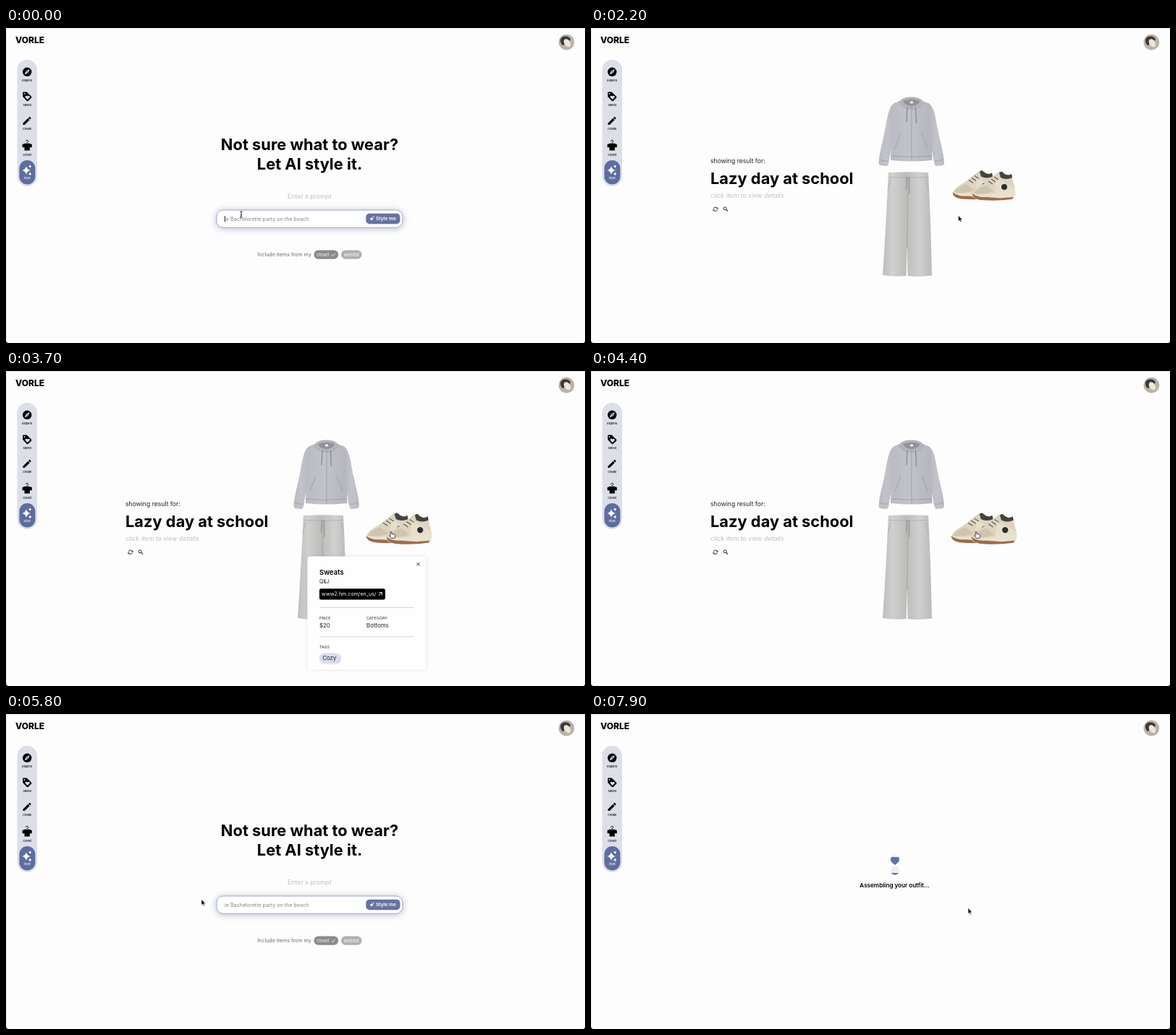
Write an HTML page that moves like this. It is 800 px wide and 436 px high and loops after 8000 ms.

```html
<!DOCTYPE html>
<html lang="en">
<head>
<meta charset="utf-8">
<title>Outfit stylist</title>
<style>
html, body { margin: 0; width: 100%; height: 100%; overflow: hidden; background: #fdfdfd; }
svg { display: block; width: 800px; height: 436px; font-family: Inter, "Liberation Sans", sans-serif; }
text { white-space: pre; }
.mid { text-anchor: middle; }
.h1 { font-size: 21.85px; font-weight: 700; }
.body { font-size: 8.65px; }
.field { font-size: 7.15px; }
.nav { font-size: 3.9px; font-weight: 500; text-anchor: middle; }
.chip { font-size: 6px; fill: #fff; }
.title { font-size: 9.5px; font-weight: 600; }
.cap { font-size: 5.4px; fill: #333; }
.val { font-size: 7.9px; fill: #222; }
.line { fill: none; stroke: #9495a0; stroke-width: .7; }
.input { filter: drop-shadow(0 1px 5px rgba(92, 108, 159, .45)); }
.card { filter: drop-shadow(0 0 2.5px rgba(0, 0, 0, .11)); }
.glow { filter: drop-shadow(1px 1px 1.5px rgba(92, 108, 159, .4)); }
</style>
</head>
<body>
<svg viewBox="0 0 800 436" xmlns="http://www.w3.org/2000/svg">
  <defs>
    <linearGradient id="fleece" x2="1">
      <stop offset="0" stop-color="#babbc3"/><stop offset=".45" stop-color="#c2c3ca"/>
      <stop offset="1" stop-color="#b4b5bd"/>
    </linearGradient>
    <linearGradient id="sweat" x2="1">
      <stop offset="0" stop-color="#bdbdbc"/><stop offset=".2" stop-color="#d0d0cf"/>
      <stop offset=".48" stop-color="#bdbdbc"/><stop offset=".53" stop-color="#c0c0bf"/>
      <stop offset=".75" stop-color="#d0d0cf"/><stop offset="1" stop-color="#bababa"/>
    </linearGradient>
    <path id="drop" d="M420 209C417 206.5 414 205 414 201.3A6 6 0 0 1 426 201.3C426 205 423 206.5 420 209Z"/>
    <clipPath id="topBulb"><use href="#drop"/></clipPath>
    <clipPath id="lowBulb"><use href="#drop" transform="translate(0 418) scale(1 -1)"/></clipPath>
    <g id="sleeve">
      <path d="M421 103C411 107 410 122 405.5 145C402 162 398 174 397.5 187L399 190L409 191.3L411 188C413 176 416 160 419 145Z" fill="url(#fleece)"/>
      <path class="line" d="M398.5 182Q404 185 411 184M418 116L416 158"/>
    </g>
    <g id="shoe">
      <path d="M527 230C529 222 538 219 546 213L561 201Q566 197 569 200Q575 206 581 202Q583 212 586 224L586 231Q556 236 527 231Z" fill="#ddd3be"/>
      <path d="M529 229Q536 220 546 218L556 226Q545 231 529 229Z" fill="#cfc4ad"/>
      <path d="M560 207L585 222L586 227L558 230Z" fill="#e6deca"/>
      <path d="M564 200.5Q567 197.5 569 200Q575 206 581 202L582 207Q574 211 566 207Z" fill="#45433f"/>
      <path d="M549 212L555 216M553 209L559 213M557 206L563 210" stroke="#5d584d" stroke-width="1.1" fill="none"/>
      <path d="M527 229Q540 232 556 229L586 225Q588 230 584 235Q560 238 545 238Q530 238 527 233Z" fill="#e9e1cf"/>
      <path d="M526.5 229Q534 235 546 234L566 235.5L584 234L582 237Q560 240 538 238Q527 236 526.5 229Z" fill="#a06a48"/>
      <circle cx="571" cy="220" r="4" fill="#2d2d30"/>
    </g>
  </defs>

  <rect width="800" height="436" fill="#fdfdfd"/>
  <path d="M0 .5H800M.3 0V436" stroke="#e6e6e6" fill="none"/>
  <path d="M0 433.5V436H2.5ZM800 434V436H798Z" fill="#222"/>

  <text x="13" y="20.7" font-size="12" font-weight="800">VORLE</text>

  <g>
    <circle cx="774.4" cy="19.6" r="10.8" fill="#b9b2a6"/>
    <path d="M766 17C766 12 773 10 778 13C781 15 780 18 777 18C773 18 773 23 769 24C767 22 766 20 766 17Z" fill="#3b3835"/>
    <ellipse cx="775.5" cy="21" rx="4" ry="6" fill="#ece6dc" transform="rotate(-35 775 21)"/>
  </g>

  <rect x="15.5" y="44" width="27.5" height="175" rx="13.7" fill="#dcdfea"/>
  <rect x="18.4" y="183" width="22" height="33.5" rx="11" fill="#5e6d9f"/>
  <circle cx="29.2" cy="60.8" r="6.2"/>
  <path d="M32.9 57L30.6 62.1L25.5 64.5L27.8 59.4Z" fill="#dcdfea"/><circle cx="29.2" cy="60.8" r=".8"/>
  <path d="M24.2 88.6H28.6L35 94.8Q35.8 95.8 35 96.7L30.7 101Q29.8 101.7 28.8 101L23.2 95V89.6Q23.2 88.6 24.2 88.6Z"/>
  <circle cx="25.5" cy="91" r=".9" fill="#dcdfea"/>
  <path d="M29.7 99L27 96.3C25.5 94.4 28 92.6 29.7 94.6C31.4 92.6 33.9 94.4 32.4 96.3Z" fill="#dcdfea"/>
  <path transform="translate(21.6 121) scale(.62)" d="M3 17.2V21H6.8L17.8 9.9L14.1 6.2ZM20.7 7A1 1 0 0 0 20.7 5.6L18.4 3.3A1 1 0 0 0 17 3.3L15.1 5.1L18.9 8.9Z"/>
  <path d="M27 159.4Q29.2 161 31.4 159.4L35.8 161V165.2H32.9V169.6H25.5V165.2H22.6V161Z"/>
  <path d="M29.2 160.2V158.3C31.4 157.6 30.9 155.3 29.2 155.3C28 155.3 27.4 156 27.4 156.9" fill="none" stroke="#000" stroke-width="1"/>
  <path id="navStars" fill="#fff"/>
  <g class="nav">
    <text x="29.2" y="73.6">Explore</text><text x="29.2" y="107.6">Saved</text>
    <text x="29.2" y="141.4">Create</text><text x="29.2" y="176.6">Closet</text>
    <text x="29.2" y="208.7" fill="#fff">Style</text>
  </g>

  <g id="prompt">
    <text class="h1 mid" x="419.5" y="168.5">Not sure what to wear?</text>
    <text class="h1 mid" x="419.5" y="195.5">Let AI style it.</text>
    <text class="body mid" x="419.5" y="236.3" font-weight="500" fill="#c9c9c9">Enter a prompt</text>
    <rect class="input" x="291" y="252" width="257" height="24.2" rx="9" fill="#fff" stroke="#a2aac8"/>
    <text id="hint" class="field" x="302" y="266.8" fill="#858585">ie Bachelorette party on the beach</text>
    <text id="typed" class="field" x="302" y="266.8" fill="#222"></text>
    <rect id="caret" y="260" width=".8" height="8.6"/>
    <rect x="497.3" y="256.8" width="47.2" height="14.4" rx="5" fill="#66739f"/>
    <path id="btnStars" fill="#fff"/>
    <text x="511" y="266.4" font-size="6.6" font-weight="600" fill="#fff">Style me</text>
    <text x="347.3" y="316.3" font-size="7.1" fill="#6c6c6c">Include items from my</text>
    <rect x="425.4" y="307.4" width="33.8" height="12.4" rx="6.2" fill="#8b8b8b"/>
    <text class="chip" x="429.3" y="315.8">closet</text>
    <path d="M449.8 314L451.4 315.7L454.8 311.8" fill="none" stroke="#fff" stroke-width=".8"/>
    <rect x="463" y="307.4" width="28.6" height="12.4" rx="6.2" fill="#b1b1b1"/>
    <text class="chip" x="466.7" y="315.8">wishlist</text>
  </g>

  <g id="loader">
    <g id="glass">
      <g clip-path="url(#topBulb)">
        <rect x="413" y="194" width="14" height="16" fill="#ededf0"/>
        <rect id="topSand" x="413" width="14" height="16" fill="#6472a3"/>
      </g>
      <g clip-path="url(#lowBulb)">
        <rect x="413" y="208" width="14" height="16" fill="#ededf0"/>
        <rect id="lowSand" x="413" width="14" height="16" fill="#6472a3"/>
      </g>
    </g>
    <text class="mid" x="419.5" y="239.9" font-size="8.1" font-weight="600">Assembling your outfit...</text>
  </g>

  <g id="result">
    <text class="body" x="165" y="187.2" fill="#222">showing result for:</text>
    <text class="h1" x="165" y="216.2">Lazy day at school</text>
    <text x="165" y="235.2" font-size="8.8" font-style="italic" fill="#c0c0c0">click item to view details</text>
    <g fill="none" stroke="#111" stroke-width=".9">
      <path d="M169.4 250.2A2.7 2.7 0 0 1 174.3 249.3M174.6 251.4A2.7 2.7 0 0 1 169.7 252.3"/>
      <path d="M173.2 250.2H176L174.8 248.2ZM170.8 251.4H168L169.2 253.4Z" fill="#111" stroke="none"/>
      <circle cx="185.2" cy="249.8" r="2"/><path d="M186.6 251.2L189 253.6" stroke-width="1.1"/>
    </g>
    <g id="hoodie">
      <use href="#sleeve"/><use href="#sleeve" transform="translate(885.5) scale(-1 1)"/>
      <path d="M427 101C420 103 417 106 416 112L414 183Q443 186 471.5 183L469.5 112C469 107 465 103 458 101Z" fill="url(#fleece)"/>
      <path d="M425 104C427 98 434 95.5 442.7 95.5C451 95.5 458 98 460.5 104C456 112 448 113 443 113C437 113 429 111 425 104Z" fill="#b2b3bb"/>
      <path d="M431 101Q442.7 96 454.5 101Q451 108 443 108Q434 108 431 101Z" fill="#92939c"/>
      <path class="line" d="M443 108V184M414.3 177Q443 180 471 177M420 167L428 145M465 167L457 145"/>
      <path class="line" d="M437 110L436 130M448.5 110L449.5 132" style="stroke:#777882;stroke-width:1"/>
      <rect x="441" y="101.5" width="4" height="3" fill="#e9e9ec"/>
    </g>
    <g id="sweats">
      <path d="M411 200Q438 198.5 466 200C468.5 240 470 300 471 342.5Q454 345 437.6 343L436.8 300L435.6 343Q419 345 403 342C406 300 409 240 411 200Z" fill="url(#sweat)"/>
      <path class="line" d="M411 206.5Q438 208 466 206.5M414 209L410 226M463 209L466 226" style="stroke:#aaa"/>
      <path class="line" d="M438 207L437.5 262L436.8 304" style="stroke:#a4a4a4;stroke-width:1"/>
      <path class="line" d="M436.5 206L435.5 224M439.5 206L440 230" style="stroke:#888;stroke-width:.9"/>
    </g>
    <g id="shoes"><use href="#shoe" transform="translate(-27 -1.5)"/><use href="#shoe"/></g>
    <g id="cards"></g>
  </g>

  <g id="cursor">
    <path id="arrow" d="M0 0V8L1.9 6.4L3.2 9.2L4.5 8.6L3.2 5.9H5.7Z" stroke="#fff" stroke-width=".6"/>
    <path id="hand" d="M-.8 .8Q0 -.4 .9 .8V3.4L5 4.3Q6 4.7 5.8 6L5 9.4H.5L-2 6Q-2.2 4.8 -.8 5.5Z" fill="#fff" stroke="#222" stroke-width=".8"/>
    <path id="beam" d="M-1.8 -4.2Q0 -4.2 0 -3.2Q0 -4.2 1.8 -4.2M0 -3.4V3.4M-1.8 4.2Q0 4.2 0 3.2Q0 4.2 1.8 4.2M-1 1H1" fill="none" stroke="#111" stroke-width=".9"/>
  </g>
</svg>
<script>
const LOOP = 8000, STEP = 100;
const $ = id => document.getElementById(id);
const show = (id, on) => { $(id).style.display = on ? '' : 'none'; };
const clamp = v => Math.max(0, Math.min(1, v));
const ease = v => v * v * (3 - 2 * v);
const during = (t, from, to) => t >= from && t < to;

const star = (x, y, r, k = r * .18) =>
  `M${x} ${y - r}Q${x + k} ${y - k} ${x + r} ${y}Q${x + k} ${y + k} ${x} ${y + r}` +
  `Q${x - k} ${y + k} ${x - r} ${y}Q${x - k} ${y - k} ${x} ${y - r}Z`;
$('navStars').setAttribute('d', star(28, 197, 5.8) + star(33.2, 191.6, 2.4) + star(33.2, 202, 2.4));
$('btnStars').setAttribute('d', star(505.2, 264.2, 2.6) + star(507.8, 261.8, 1.2));

// Detail cards, opened at the point of the click
const items = [
  { id: 'hoodie', x: 425.5, y: 152.3, name: 'Zip-up Hoodie', price: '$25', kind: 'Tops', tags: ['Minimal', 'Cozy'], open: [2800, 3200], hover: [2600, 3100], mid: [443, 143] },
  { id: 'sweats', x: 416.5, y: 256.5, name: 'Sweats', price: '$20', kind: 'Bottoms', tags: ['Cozy'], open: [3300, 3800], hover: [3200, 3500], mid: [437, 271] },
  { id: 'shoes', x: 533, y: 224, name: 'Sneakers', price: '$90', kind: 'Shoes', tags: ['Cozy'], open: [3800, 4400], hover: [3600, 4600], mid: [543, 218] }
];

function tagChips(tags) {
  let x = 16.5;
  return tags.map(tag => {
    const cozy = tag === 'Cozy', w = cozy ? 28.5 : 37, left = x;
    x += w + 2.5;
    return `<rect ${cozy ? 'class="glow"' : ''} x="${left}" y="134.2" width="${w}" height="12.8" rx="6.4" fill="${cozy ? '#d8dcea' : '#ededee'}"/>
      <text class="val" x="${left + 4.2}" y="143">${tag}</text>`;
  }).join('');
}

const card = c => `<g id="${c.id}Card" transform="translate(${c.x} ${c.y})">
  <rect class="card" width="164" height="156.8" rx="4" fill="#fefefe"/>
  <path d="M151 8.9L155 12.9M155 8.9L151 12.9" stroke="#111" stroke-width=".9"/>
  <text class="title" x="16.5" y="25.7">${c.name}</text>
  <text x="16.5" y="37.7" font-size="7" fill="#222">Q&amp;J</text>
  <rect x="16.5" y="44.7" width="91" height="15.2" rx="2.6"/>
  <svg x="17" y="44.7" width="77.5" height="15.2"><text x="2.6" y="10" font-size="7.1" fill="#fff">www2.hm.com/en_us/</text></svg>
  <path d="M98.3 54.4L102.6 50.1M99 50H102.8V53.8" fill="none" stroke="#fff" stroke-width=".9"/>
  <path d="M16.5 71H147M16.5 111.3H147" stroke="#d2d2d2" stroke-width=".9"/>
  <text class="cap" x="16.5" y="87.5">PRICE</text><text class="cap" x="81.5" y="87.5">CATEGORY</text>
  <text class="val" x="16.5" y="98.4">${c.price}</text><text class="val" x="81.5" y="98.4">${c.kind}</text>
  <text class="cap" x="16.5" y="127.6">TAGS</text>${tagChips(c.tags)}</g>`;
$('cards').innerHTML = items.map(card).join('');

// Pointer path: time, x, y, shape until the next point
const path = [
  [0, 325, 258, 'beam'], [100, 325, 258, ''], [900, 521, 262, 'hand'], [1000, 519, 261, 'arrow'],
  [1400, 507.5, 259.5, 'arrow'], [2200, 507.5, 259.5, 'arrow'], [2600, 424.5, 151.5, 'hand'],
  [2900, 424.5, 151.5, 'hand'], [3200, 417, 256, 'hand'], [3400, 417, 256, 'hand'],
  [3700, 532, 222, 'hand'], [4500, 532, 222, 'hand'], [4600, 524, 226, 'arrow'],
  [4800, 524, 226, 'arrow'], [5300, 268, 318.5, 'arrow'], [5600, 186, 249, 'hand'],
  [5700, 215, 253, 'arrow'], [5900, 325, 260, 'beam'], [6000, 325, 260, ''],
  [7000, 521, 264, 'hand'], [7200, 521, 266, 'arrow'], [7900, 521, 268.5, 'arrow'], [8000, 521, 268.5, 'arrow']
];

function drawCursor(t) {
  const i = path.findIndex((p, n) => n + 1 === path.length || t < path[n + 1][0]);
  const a = path[i], b = path[i + 1] || a;
  const k = ease(clamp((t - a[0]) / (b[0] - a[0] || 1)));
  const x = a[1] + (b[1] - a[1]) * k, y = a[2] + (b[2] - a[2]) * k;
  $('cursor').setAttribute('transform', `translate(${x} ${y})`);
  for (const s of ['arrow', 'hand', 'beam']) show(s, a[3] === s);
}

const prompts = [
  { text: 'Lazy day at school', start: 0, end: 800 },
  { text: 'Vacation in Europe, summer,', start: 5900, end: 6800 }
];

function drawPrompt(t) {
  const p = prompts[t < 5700 ? 0 : 1];
  const n = Math.round(p.text.length * clamp((t - p.start) / (p.end - p.start)));
  const typed = $('typed');
  typed.textContent = p.text.slice(0, n);
  show('hint', n === 0);
  show('caret', t >= p.start);
  $('caret').setAttribute('x', 302 + (n ? typed.getComputedTextLength() : 0));
}

// Sand runs down, then the glass turns over
function drawLoader(age) {
  const u = age % 650, p = clamp(u / 250);
  $('topSand').setAttribute('y', 195.3 + 13.7 * p);
  $('lowSand').setAttribute('y', 222.8 - 13.8 * p);
  $('glass').setAttribute('transform', `rotate(${180 * ease(clamp((u - 440) / 210))} 420 209)`);
}

function drawItems(t) {
  for (const c of items) {
    const [from, to] = c.hover, [x, y] = c.mid;
    const k = clamp((t - from + 100) / 200) * clamp((to - t) / 200);
    $(c.id).setAttribute('transform', `translate(${x} ${y}) scale(${1 + .045 * k}) translate(${-x} ${-y})`);
    show(c.id + 'Card', during(t, ...c.open));
  }
}

function draw(t) {
  const loading = during(t, 1000, 2100) || t >= 7200;
  const result = during(t, 2100, 5700);
  const prompt = !loading && !result;
  show('prompt', prompt);
  show('loader', loading);
  show('result', result);
  if (prompt) drawPrompt(t);
  if (loading) drawLoader(t - (t < 5000 ? 1000 : 7200));
  if (result) drawItems(t);
  drawCursor(t);
}

const begin = performance.now();
function tick() {
  const t = (performance.now() - begin) % LOOP;
  draw(Math.floor(t / STEP) * STEP);
  requestAnimationFrame(tick);
}
draw(0);
requestAnimationFrame(tick);
</script>
</body>
</html>
```
